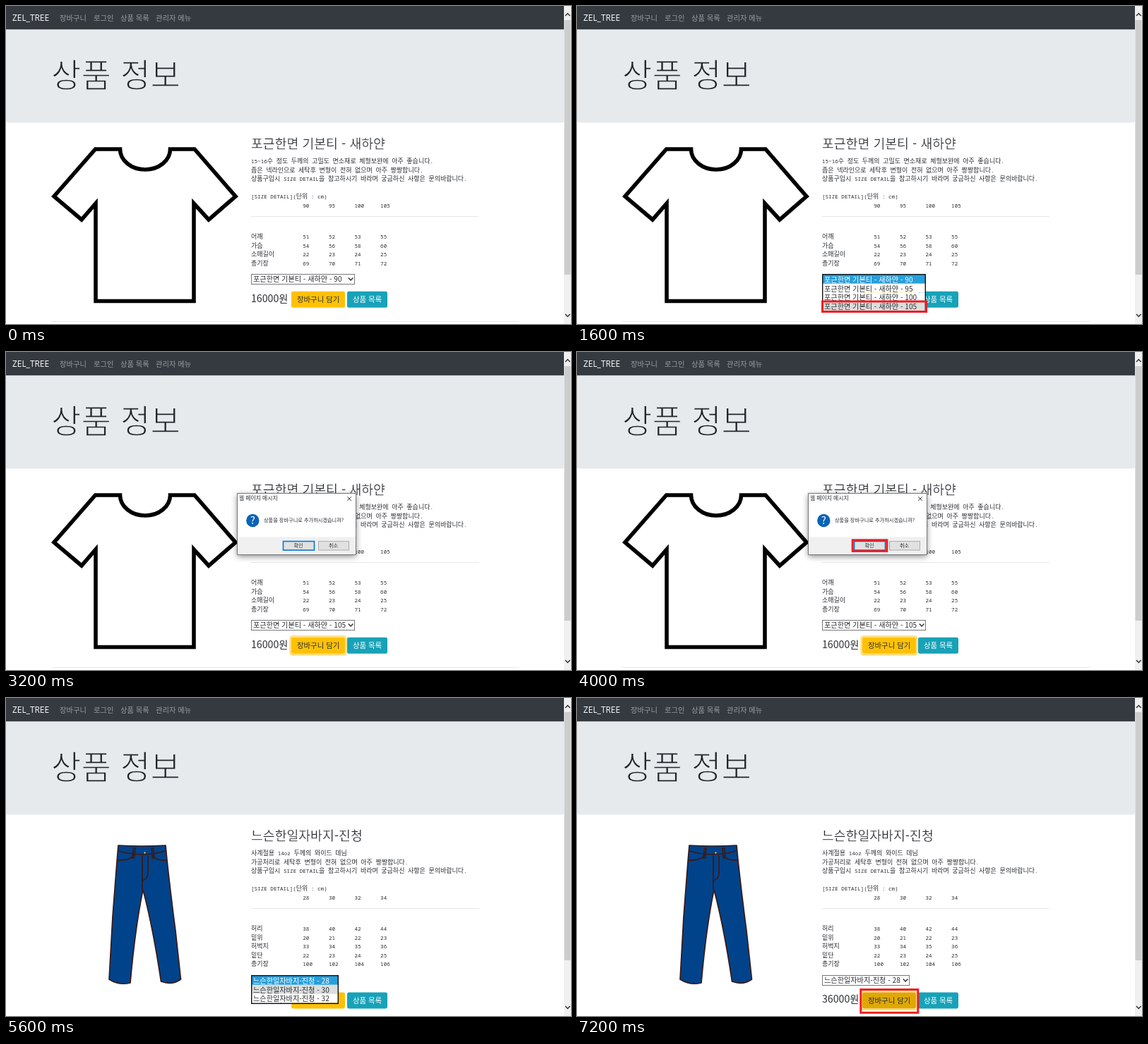
Write an HTML page that moves like this. It is 800 px wide and 451 px high and loops after 8 s.

```html
<!DOCTYPE html>
<html lang="ko">
<head>
<meta charset="utf-8">
<title>상품 정보</title>
<style>
html, body { margin: 0; width: 100%; height: 100%; overflow: hidden; background: #fff; }
svg { display: block; width: 800px; height: 451px; }
text { font: 10.4px 'Noto Sans CJK KR', 'Noto Sans CJK JP', sans-serif; fill: #2a2e33; white-space: pre; }
.brand { font: 11.9px 'Open Sans', sans-serif; fill: #fff; }
.nav { font-size: 10.3px; fill: #9a9da0; }
/* A background-coloured outline thins the strokes */
.title { font-size: 46.2px; font-weight: 300; fill: #212529; stroke: #e7eaed; stroke-width: 1.5; }
.name { font-size: 18.3px; stroke: #fff; stroke-width: .25; }
.price { font-size: 14.2px; }
.option { font-size: 10.15px; }
.note { font-size: 9px; }
.code { font: 7.6px 'Noto Sans Mono', monospace; }
.white { fill: #fff; }
.caption { font-size: 7.8px; }
.small { font-size: 7.2px; }
.help { font-size: 15px; }
.mid { text-anchor: middle; }
.chev { fill: none; stroke: #333; stroke-width: 1.5; }
.close { fill: none; stroke: #333; }
.red { fill: none; stroke: #ed1c24; stroke-width: 3; }
.tee { fill: #fff; stroke: #000; stroke-width: 5.6; }
.jeans { fill: none; stroke: #3a1a16; stroke-width: 1.7; stroke-linejoin: round; }
.cloth { fill: #00438b; }
</style>
</head>
<body>
<svg id="stage" viewBox="0 0 800 451"></svg>
<script>
const STEP = 800, STEPS = 10;

const text = (x, y, s, cls = '') => `<text x="${x}" y="${y}" class="${cls}">${s}</text>`;
const rect = (x, y, w, h, fill, more = '') =>
  `<rect x="${x}" y="${y}" width="${w}" height="${h}" fill="${fill}" ${more}/>`;
const path = (d, cls) => `<path d="${d}" class="${cls}"/>`;
const red = (x, y, w, h) => rect(x, y, w, h, 'none', 'class="red"');
// Visible only during the listed steps
const on = (steps, ...parts) => `<g data-on="${steps}">${parts.join('')}</g>`;
// Latin runs are monospaced inside Hangul notes
const note = (x, y, s) =>
  text(x, y, s.replace(/[ -~]+/g, run => `<tspan class="code">${run}</tspan>`), 'note');

function select(y, w, label, focus) {
  const right = 347 + w;
  return rect(347.5, y + .5, w - 1, 14, '#fff', 'stroke="#777"') +
    (focus ? rect(349, y + 2, w - 14, 11, '#279fdc') + rect(right - 12, y + 1, 11, 13, '#e4e4e4') : '') +
    text(350, y + 11.3, label, focus ? 'option white' : 'option') +
    path(`M${right - 9.2} ${y + 5.5}l3.3 3.5 3.3-3.5`, 'chev');
}

function list(y, w, labels, hover) {
  const rowFill = i => i === 0 ? '#279fdc' : i === hover ? '#dcdedc' : '#fff';
  return labels.map((s, i) =>
      rect(348, y + 1 + i * 12.8, w - 2, 12.8, rowFill(i)) +
      text(350, y + 11.8 + i * 12.8, s, i ? 'option' : 'option white')).join('') +
    rect(347.7, y + .7, w - 1.4, labels.length * 12.8 + 1.2, 'none', 'stroke="#111" stroke-width="1.4"');
}

function cart(y, fill, glow) {
  return (glow ? rect(402.6, y - 1.4, 78.8, 25.8, 'none', 'rx="3" stroke="#ffdc78" stroke-width="2.4"') : '') +
    rect(404, y, 76, 23, fill, 'rx="2.4"') + text(412, y + 15.6, '장바구니 담기');
}

function details(p) {
  return text(347, 201.5, p.name, 'name') +
    p.notes.map((s, i) => note(347, 223.3 + i * 12.5, s)).join('') +
    note(347, 272.8, '[SIZE DETAIL](단위 : cm)') +
    rect(347, 298, 322, 1, '#e7e7e7') +
    [['', ...p.sizes], ...p.rows].map((row, r) => {
      const y = r ? 330 + (r - 1) * 12.5 : 286;
      return row.map((v, c) => note(c ? 383.7 + c * 36.6 : 347, y, v)).join('');
    }).join('') +
    text(347, p.y + 39.5, p.price, 'price') +
    rect(483, p.y + 24.8, 57, 23, '#17a2b8', 'rx="2.4"') +
    text(491, p.y + 40.4, '상품 목록', 'white');
}

const closing = '세탁후 변형이 전혀 없으며 아주 짱짱합니다.';
const guide = '상품구입시 SIZE DETAIL을 참고하시기 바라며 궁금하신 사항은 문의바랍니다.';

const shirt = {
  name: '포근한면 기본티 - 새하얀', price: '16000원', y: 380,
  notes: ['15~16수 정도 두께의 고밀도 면소재로 체형보완에 아주 좋습니다.', '좁은 넥라인으로 ' + closing, guide],
  sizes: [90, 95, 100, 105].map(String),
  rows: ['어깨 51 52 53 55', '가슴 54 56 58 60', '소매길이 22 23 24 25', '총기장 69 70 71 72'].map(s => s.split(' '))
};
const pants = {
  name: '느슨한일자바지-진청', price: '36000원', y: 392.7,
  notes: ['사계절용 14oz 두께의 와이드 데님', '가공처리로 ' + closing, guide],
  sizes: [28, 30, 32, 34].map(String),
  rows: ['허리 38 40 42 44', '밑위 20 21 22 23', '허벅지 33 34 35 36', '밑단 22 23 24 25', '총기장 100 102 104 106'].map(s => s.split(' '))
};
const option = (p, size) => `${p.name} - ${size}`;

const frame =
  rect(0, 30, 790, 135.5, '#e7eaed', 'rx="3"') +
  rect(0, 0, 790, 33.2, '#343a40') +
  text(9, 21.3, 'ZEL_TREE', 'brand') +
  [[76, '장바구니'], [124, '로그인'], [162, '상품 목록'], [212, '관리자 메뉴']]
    .map(([x, s]) => text(x, 21, s, 'nav')).join('') +
  text(64, 114.5, '상품 정보', 'title') +
  rect(790, 0, 10, 451, '#f0f0f0') +
  path('M792 14l3.3-3.5 3.3 3.5M792 437l3.3 3.5 3.3-3.5', 'chev');

const thumb = bottom => rect(790.5, 20, 9, bottom - 20, '#cdcdcd');

const tee = path('M126.5 203H161.5A35.5 29 0 0 0 232.5 203H267L325 270 287 303 266 280V418.5H127V280L107 303 68 270Z', 'tee');

const jeans =
  path('M159 209Q192 211 226 209L228 230Q234 285 240 330L247.5 399Q235 408 219.5 402Q208 325 194 272Q183 325 176 404Q160 408 146 399L151 310 157 232Z',
    'jeans cloth') +
  path('M158 216.5Q192 227 227 216.5M193 223.5V272M201 223.5V249Q200 257 193 259M158 230Q178 231 181 221M228 230Q209 231 206 221', 'jeans') +
  path('M180.5 213l-1.5 14h2.5l1.5-14ZM206 213l1.5 14h2.5l-1.5-14Z', 'jeans') +
  '<circle cx="196.5" cy="219.5" r="1.8" fill="#c9b79d" stroke="#3a1a16"/>';

const dialog =
  rect(327.5, 201, 168, 87, '#777', 'style="filter:drop-shadow(0 2px 4px #0007)"') +
  rect(327.5, 200.5, 168, 87, '#fff', 'stroke="#777"') +
  rect(328, 262.5, 167, 24.5, '#f0f0f0') +
  text(330, 210.3, '웹 페이지 메시지', 'caption') +
  path('M483.3 205.3l5.6 5.6m0-5.6l-5.6 5.6', 'close') +
  '<circle cx="349.3" cy="239" r="9.2" fill="#0a63b5"/>' +
  text(349.3, 244.3, '?', 'help white mid') +
  text(365, 241.4, '상품을 장바구니로 추가하시겠습니까?', 'small') +
  rect(392.5, 268.5, 44, 12.5, '#e1e1e1', 'stroke="#0078d7" stroke-width="1.6"') +
  rect(442.5, 268.5, 43, 12.5, '#e1e1e1', 'stroke="#adadad"') +
  text(414, 277.3, '확인', 'small mid') +
  text(463.5, 277.3, '취소', 'small mid');

const yellow = '#ffc107', amber = '#e0a800';

const shirtPage = on('012345',
  thumb(381), tee, details(shirt), rect(64, 447, 662, 1, '#e7e7e7'),
  on('012', cart(404.8, yellow)),
  on('3', cart(404.8, amber)),
  on('45', cart(404.8, yellow, true)),
  on('0', select(380, 147, option(shirt, 90))),
  on('12', list(380, 147, shirt.sizes.map(s => option(shirt, s)), 3)),
  on('2', red(347.5, 419, 147, 14.5)),
  on('3', select(380, 147, option(shirt, 105), true), red(402.5, 404.5, 78, 24.5)),
  on('45', select(380, 147, option(shirt, 105)), dialog),
  on('5', red(390.2, 266.8, 48.6, 15.6)));

const pantsPage = on('6789',
  thumb(372), jeans, details(pants),
  on('69', cart(417.5, amber, true), select(393, 124, option(pants, 28))),
  on('78', cart(417.5, yellow), list(393, 124, pants.sizes.slice(0, 3).map(s => option(pants, s)), 1)),
  on('8', red(345.8, 407, 126, 13.2)),
  on('9', red(401.8, 413.5, 81, 32.8)));

const stage = document.getElementById('stage');
stage.innerHTML = frame + shirtPage + pantsPage;

for (const el of stage.querySelectorAll('[data-on]')) {
  const keys = Array.from({ length: STEPS + 1 }, (_, i) => ({
    offset: i / STEPS,
    opacity: el.dataset.on.includes(i % STEPS) ? 1 : 0,
    easing: 'step-end'
  }));
  el.animate(keys, { duration: STEP * STEPS, iterations: Infinity });
}
</script>
</body>
</html>
```
